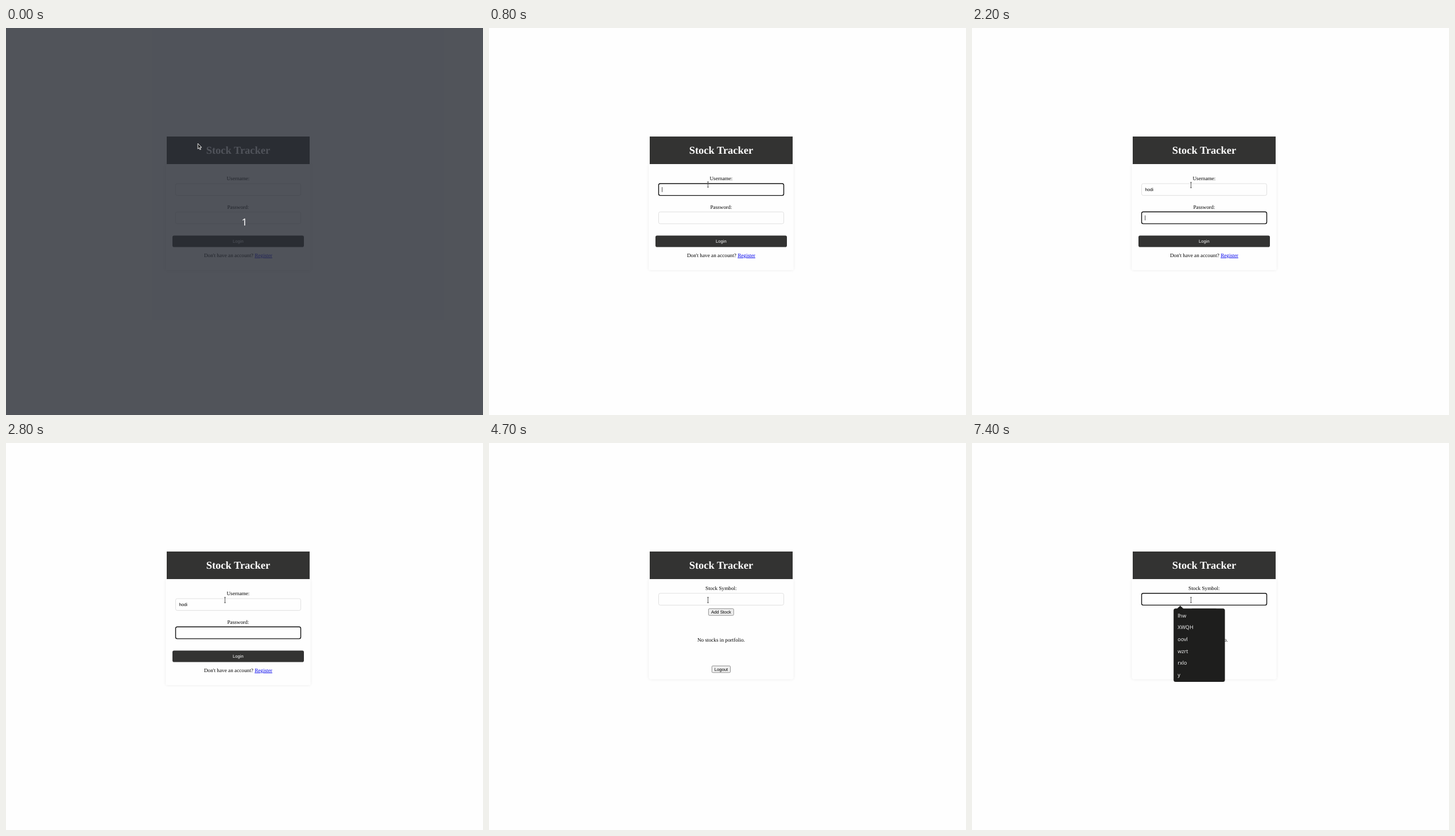
Recreate the animation shown at these times as an HTML page. Size 831x674 px, loop 8000 ms.

```html
<!DOCTYPE html>
<html lang="en">
<head>
<meta charset="utf-8">
<title>Login demo</title>
<style>
  html, body { margin: 0; width: 100%; height: 100%; overflow: hidden; background: #fefefe; }
  svg { display: block; width: 100%; height: 100%; }
  text { text-rendering: geometricPrecision; }
  .serif { font: 9.23px "Liberation Serif", serif; text-anchor: middle; }
  .sans { font: 7.69px "Liberation Sans", sans-serif; }
  .mid { text-anchor: middle; }
  .title { font: bold 18.46px "Liberation Serif", serif; text-anchor: middle; fill: #fefefe; }
  .item { font: 500 9px "Noto Sans", sans-serif; fill: #f0f0f0; }
  .count { font: 17px "Noto Sans", sans-serif; text-anchor: middle; fill: #fff; }
  .link { fill: #00e; text-decoration: underline; }
  .field { fill: #fefefe; stroke: #ddd; stroke-width: .9; }
  .field.focus { stroke: #101010; stroke-width: 1.4; }
  .button { fill: #efefef; stroke: #767676; stroke-width: .8; }
</style>
</head>
<body>
<svg viewBox="0 0 831 674">
  <defs>
    <filter id="shadow" x="-10%" y="-10%" width="120%" height="120%">
      <feDropShadow dx="0" dy="0" stdDeviation="2.2" flood-color="#000" flood-opacity=".1"/>
    </filter>
  </defs>
  <rect width="831" height="674" fill="#fefefe"/>
  <rect id="card" x="278.7" y="237" width="251.6" rx="2.5" fill="#fefefe" filter="url(#shadow)"/>
  <rect x="280" y="189" width="249" height="48" fill="#333332"/>
  <text class="title" x="404.4" y="218.8">Stock Tracker</text>

  <g id="login">
    <text class="serif" x="404.4" y="265.4">Username:</text>
    <text class="serif" x="404.4" y="314.7">Password:</text>
    <rect id="userField"/>
    <rect id="passField"/>
    <text class="sans" id="userText" x="301.4" y="284"></text>
    <text class="sans" id="passText" x="301.4" y="333.3"></text>
    <rect x="290" y="361.6" width="229" height="20" rx="2.8" fill="#333332"/>
    <text class="sans mid" x="404.4" y="374.3" fill="#fefefe">Login</text>
    <text class="serif" x="404.4" y="398.8">Don't have an account? <tspan class="link">Register</tspan></text>
  </g>

  <g id="portfolio">
    <text class="serif" x="404.4" y="256.4">Stock Symbol:</text>
    <rect id="symbolField"/>
    <rect class="button" x="382.4" y="288.6" width="43.8" height="11.6" rx="1.6"/>
    <text class="sans mid" x="404.4" y="297.1">Add Stock</text>
    <text class="serif" x="404.4" y="345.6">No stocks in portfolio.</text>
    <rect class="button" x="388.3" y="388.2" width="32.2" height="11.6" rx="1.6"/>
    <text class="sans mid" x="404.4" y="396.7">Logout</text>
  </g>

  <rect id="caret" width=".7" height="8.6"/>

  <g id="popup">
    <path d="M356.8 289 L362.8 283.2 L368.8 289 Z" fill="#1e1e1d"/>
    <rect x="351.2" y="288.2" width="89.4" height="127.8" rx="3.5" fill="#1e1e1d"/>
  </g>

  <g id="countdown">
    <rect width="831" height="674" fill="#282c34" fill-opacity=".81"/>
    <text class="count" x="415.3" y="343.5">1</text>
  </g>

  <path id="arrow" d="M0 0 V9.6 L2.2 7.6 L3.7 11 L5.2 10.3 L3.7 7 H6.7 Z"
        fill="#222" stroke="#fff" stroke-width=".9" stroke-linejoin="round"/>
  <path id="beam" d="M-1.5 -4.6 H1.5 M0 -4.6 V4.6 M-1.5 4.6 H1.5"
        fill="none" stroke="#4a4a4a" stroke-width=".9"/>
</svg>
<script>
const LOOP = 8000;
const USER = "hodi";
const SYMBOLS = ["lhw", "XWQH", "oovl", "wzrt", "rxlo", "y"];
const USER_KEYS = [1500, 1600, 1700, 1800];
const PASS_KEYS = [2900, 3100, 3200, 3500, 3600, 3800, 3900, 4100];
const CARET_OFF = [[1300, 1500], [2800, 2900], [7400, 8000]];
const FIELD_Y = { user: 281.3, pass: 330.6, symbol: 272.1 };
const TEXT_X = 301.4;

const $ = id => document.getElementById(id);
const setAttrs = (el, attrs) => {
  for (const key in attrs) el.setAttribute(key, attrs[key]);
};
const show = (id, visible) => $(id).setAttribute("display", visible ? "inline" : "none");
const within = (t, from, to) => t >= from && t < to;
const typed = (keys, t) => keys.filter(k => t >= k).length;

for (const name in FIELD_Y) {
  setAttrs($(name + "Field"), { x: 295.5, y: FIELD_Y[name] - 10.3, width: 218, height: 20.6, rx: 2.8 });
}

SYMBOLS.forEach((symbol, i) => {
  const item = document.createElementNS("http://www.w3.org/2000/svg", "text");
  setAttrs(item, { class: "item", x: 358.3, y: 303.8 + i * 20.65 });
  item.textContent = symbol;
  $("popup").append(item);
});

function focusedField(t) {
  if (within(t, 800, 2200)) return "user";
  if (within(t, 2200, 4600)) return "pass";
  return t >= 6900 ? "symbol" : null;
}

function drawCaret(t, focus) {
  const blinkedOff = CARET_OFF.some(([from, to]) => within(t, from, to));
  show("caret", focus && !blinkedOff);
  if (!focus) return;
  const text = focus === "symbol" ? null : $(focus + "Text");
  const width = text && text.textContent ? text.getComputedTextLength() : 0;
  setAttrs($("caret"), { x: TEXT_X + width, y: FIELD_Y[focus] - 4.2 });
}

function drawPointer(t) {
  // The pointer advances in 100 ms steps, like the screen capture it imitates.
  const step = Math.floor(t / 100) * 100;
  const p = Math.min(1, Math.max(0, (step - 200) / 600));
  const ease = p * p * (3 - 2 * p);
  const x = 334.2 + 47.3 * ease;
  const y = 201 + 71.6 * ease + (t >= 1000 ? 0.9 : 0);
  const isBeam = y > 270.5 && !within(t, 4400, 4700);
  show("beam", isBeam);
  show("arrow", !isBeam);
  $(isBeam ? "beam" : "arrow").setAttribute("transform", `translate(${x} ${y})`);
}

function render(t) {
  const loggedIn = t >= 4600;
  const focus = focusedField(t);
  show("countdown", t < 100);
  show("login", !loggedIn);
  show("portfolio", loggedIn);
  show("popup", t >= 6900);
  $("card").setAttribute("height", loggedIn ? 174.2 : 184.4);
  $("userText").textContent = USER.slice(0, typed(USER_KEYS, t));
  $("passText").textContent = "•".repeat(typed(PASS_KEYS, t));
  for (const name in FIELD_Y) {
    $(name + "Field").setAttribute("class", name === focus ? "field focus" : "field");
  }
  drawCaret(t, focus);
  drawPointer(t);
}

function tick() {
  render(performance.now() % LOOP);
  requestAnimationFrame(tick);
}
tick();
</script>
</body>
</html>
```
